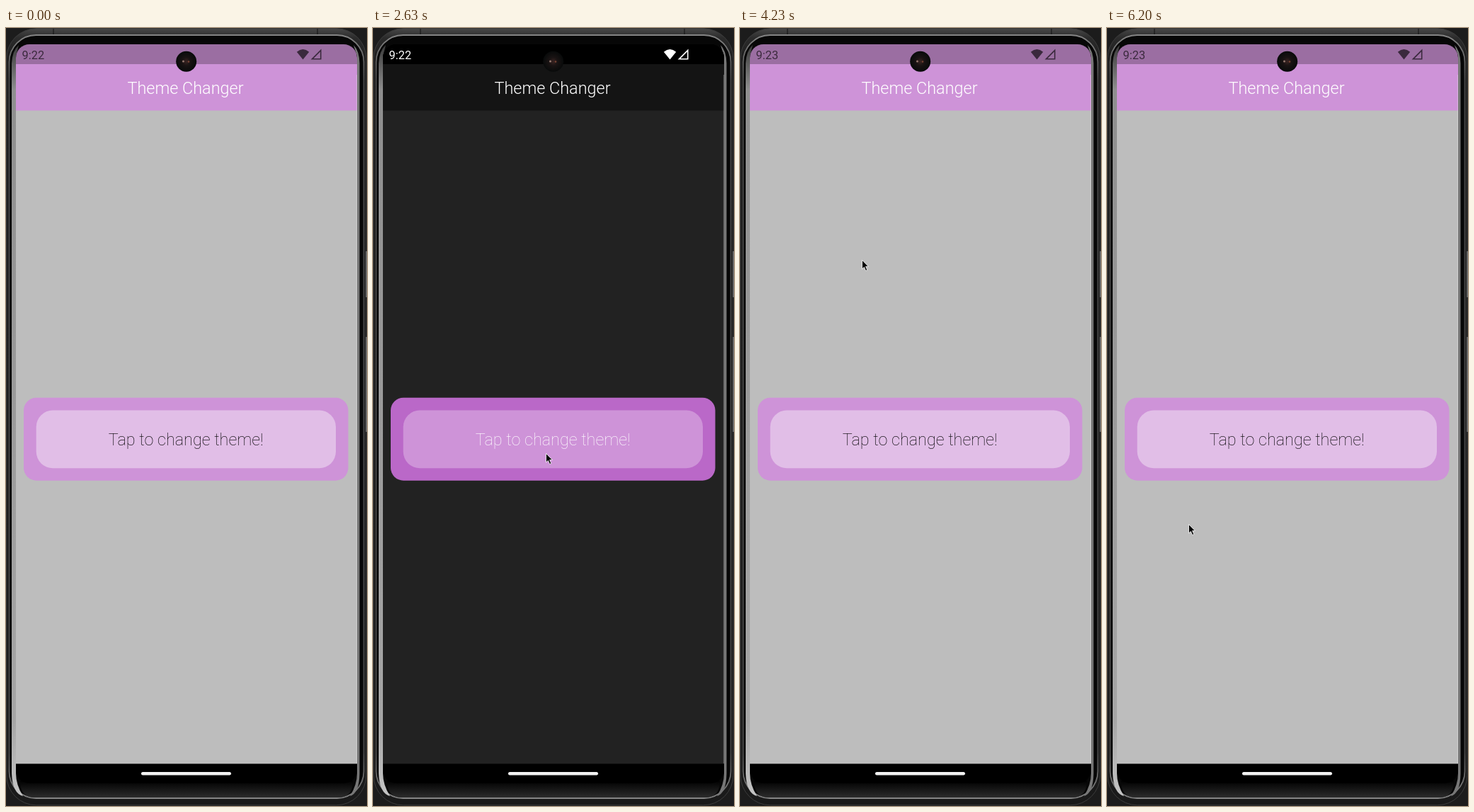
An HTML page that plays this animation: 510x1098 px, repeating every 6530 ms.

```html
<!DOCTYPE html>
<html lang="en">
<head>
<meta charset="utf-8">
<title>Theme Changer</title>
<style>
  html, body { margin: 0; width: 100%; height: 100%; overflow: hidden; background: #1c1c1c; }
  svg { display: block; width: 100vw; height: 100vh; }
  text { font-family: Roboto, sans-serif; }
  .label { font-size: 23.45px; text-anchor: middle; }
  #title { font-weight: 300; }
  #tap { font-weight: 200; }
</style>
</head>
<body>
<svg viewBox="0 0 510 1098">
  <defs>
    <linearGradient id="shell" x2="0" y2="1">
      <stop offset="0" stop-color="#484848"/>
      <stop offset=".012" stop-color="#2b2b2b"/>
      <stop offset=".04" stop-color="#1d1d1d"/>
      <stop offset="1" stop-color="#1a1a1a"/>
    </linearGradient>
    <linearGradient id="edge" x2="0" y2="1">
      <stop offset="0" stop-color="#858585"/>
      <stop offset=".06" stop-color="#484848"/>
      <stop offset=".94" stop-color="#484848"/>
      <stop offset="1" stop-color="#858585"/>
    </linearGradient>
    <linearGradient id="rim" x2="0" y2="1">
      <stop offset="0" stop-color="#3a3a3a"/>
      <stop offset=".06" stop-color="#8f8f8f"/>
      <stop offset=".9" stop-color="#a6a6a6"/>
      <stop offset="1" stop-color="#c4c4c4"/>
    </linearGradient>
    <linearGradient id="chin" x2="0" y2="1">
      <stop offset="0" stop-color="#000"/>
      <stop offset="1" stop-color="#2c2c2c"/>
    </linearGradient>
    <radialGradient id="lens">
      <stop offset="0" stop-color="#3a2422"/>
      <stop offset=".4" stop-color="#191313"/>
      <stop offset="1" stop-color="#080a0a"/>
    </radialGradient>
    <clipPath id="screen"><rect x="14" y="23" width="482" height="1043" rx="19"/></clipPath>
  </defs>

  <!-- phone body -->
  <rect width="510" height="1098" fill="#1c1c1c"/>
  <rect x=".8" y=".8" width="508" height="1096" rx="42" fill="url(#shell)" stroke="#3c3c3c"/>
  <path d="M67 1V9M440 1V9" stroke="#111"/>
  <rect x="4.500" y="10" width="501" height="1077" rx="38" fill="#070707" stroke="url(#edge)" stroke-width="1.800"/>
  <path d="M20 1062H490Q490 1086 470 1086H40Q20 1086 20 1062Z" fill="url(#chin)"/>
  <path d="M8 50Q9 32 18 24L14 40V1052Q14 1068 24 1084Q9 1080 8 1052Z" fill="url(#rim)"/>
  <path d="M499.500 50Q499 32 491 24L496 40V1052Q496 1068 486 1084Q499 1080 499.500 1052Z" fill="#777"/>
  <path d="M509 315V380M509 436V570" stroke="#666" stroke-width="2"/>

  <!-- screen -->
  <g clip-path="url(#screen)">
    <rect x="14" y="23" width="482" height="1043"/>
    <rect id="body" x="14" y="116" width="482" height="922.400"/>
    <rect id="bar" x="14" y="51" width="482" height="65.500"/>
    <rect id="status" x="14" y="23" width="482" height="28"/>
    <path d="M495.400 66V1038" stroke="#fff" stroke-opacity=".3"/>
  </g>
  <g id="icons">
    <text id="clock" x="22.500" y="43.500" font-size="16.400"></text>
    <path d="M419.500 44.500L410.800 33.700Q419.500 26.500 428.200 33.700Z"/>
    <path fill-rule="evenodd" d="M430.500 44.500L445.500 29.500V44.500ZM434.500 42.900H443.900V33.500Z"/>
  </g>
  <circle cx="254.700" cy="47.300" r="14.500" fill="url(#lens)"/>
  <circle cx="250.500" cy="47" r="1.500" fill="#b9958a" opacity=".75"/>
  <circle cx="258" cy="47.500" r="1.300" fill="#8a4a38" opacity=".8"/>
  <text id="title" class="label" x="253.500" y="92.600">Theme Changer</text>
  <rect id="card" x="25" y="521.700" width="458.500" height="117" rx="18"/>
  <rect id="button" x="42.700" y="539.500" width="423.300" height="81.800" rx="23.500"/>
  <text id="tap" class="label" x="254.200" y="589">Tap to change theme!</text>
  <rect x="191" y="1050" width="127" height="4.500" rx="2.200" fill="#f2f2f2"/>

  <path id="cursor" d="M.5 .5V13L3.400 10.400L5.600 15.500L7.800 14.500L5.600 9.600H9.400Z" stroke="#fff" stroke-width=".8"/>
</svg>
<script>
const LOOP = 6530, CLOCK_TICK = 3750;
const MOVE = 300;   // longest pointer move
const LEAD = 50;    // the first visible step of a theme change is already this far in
const taps = [2230, 3547, 4670, 5730];

// Pointer stops: arrival time, x, y
const stops = [
  [100, 80, 665], [335, 239, 243], [570, 188, 453], [1200, 230, 108], [1530, 314, 210],
  [1870, 229, 572], [2630, 244, 600], [3430, 244, 600], [3630, 198, 483], [3870, 170, 309],
  [4230, 172, 327], [4330, 199, 590], [4900, 118, 608], [5300, 103, 664], [5530, 103, 563],
  [6200, 115, 700]
];

const $ = id => document.getElementById(id);
const clamp = v => Math.min(1, Math.max(0, v));
const smooth = k => k * k * (3 - 2 * k);
const mix = (a, b, k) => a.map((v, i) => v + (b[i] - v) * k);
const gray = v => [v, v, v];
const fill = (id, c) => $(id).setAttribute("fill", `rgb(${c.map(Math.round)})`);

const pale = [225, 190, 231], soft = [206, 147, 216], deep = [186, 104, 200];

// 0 = light, 1 = dark; each tap flips the value
function blend(t, ease) {
  return taps.reduce((v, start, i) => {
    const k = t < start ? 0 : clamp(ease(t - start + LEAD));
    return i % 2 ? v - k : v + k;
  }, 0);
}

function pointer(t) {
  return stops.reduce((at, [end, ...to], i) => {
    if (!i) return to;
    const start = Math.max(stops[i - 1][0], end - MOVE);
    return mix(at, to, smooth(clamp((t - start) / (end - start))));
  }, []);
}

function draw(t) {
  const p = blend(t, d => d / 200);
  const ink = blend(t, d => (d / 370) ** 2);
  const glyph = blend(t, d => (d - 150) / 60);
  const dark = p > 0.5;
  const card = mix(soft, deep, p);
  const bar = dark ? mix(gray(255), gray(20), p) : card;
  const shade = dark ? 1.5 * (1 - p) : 0.75;

  fill("body", mix(gray(189), gray(34), p));
  fill("bar", bar);
  fill("status", bar.map(v => v * shade));
  fill("title", gray(255 * (dark ? p : 1 - p)));
  fill("card", card);
  fill("button", mix(pale, soft, p));
  fill("tap", gray(255 * ink));
  fill("icons", gray(255 * glyph));
  $("icons").setAttribute("opacity", 0.62 + 0.38 * glyph);
  $("clock").textContent = t < CLOCK_TICK ? "9:22" : "9:23";

  $("cursor").setAttribute("transform", `translate(${pointer(t)})`);
  $("cursor").setAttribute("visibility", t < stops[0][0] ? "hidden" : "visible");
}

const began = performance.now();
function tick() {
  draw((performance.now() - began) % LOOP);
  requestAnimationFrame(tick);
}
tick();
</script>
</body>
</html>
```
